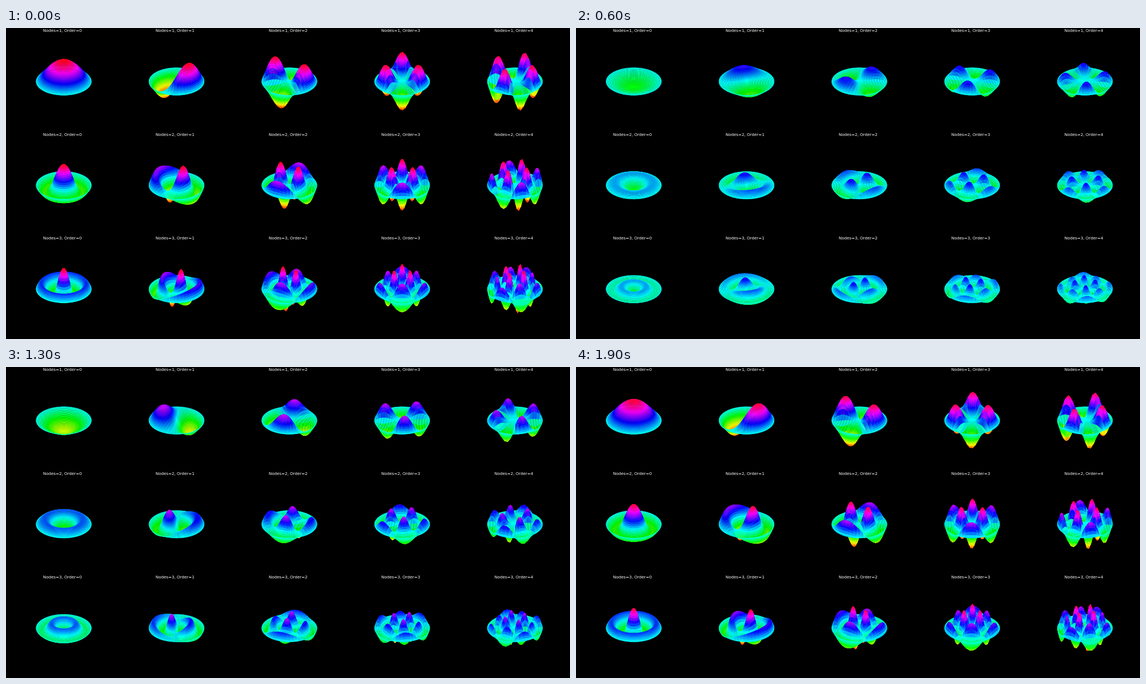
Animation of 1007 by 556 pixels, one loop 2000 ms. Source, as a matplotlib script:

```python
import numpy as np
import matplotlib.pyplot as plt
from matplotlib.animation import FuncAnimation
from matplotlib.collections import PathCollection
from matplotlib.path import Path

W, H, DPI = 1007, 556, 64
ROWS, COLS = 3, 5
FRAMES, INTERVAL = 20, 100
RINGS, SPOKES = 40, 50
ELEV, AZIM, DIST = np.radians(30), np.radians(-60), 10
SCALE = 95.1               # pixels per box unit at the view centre
R_SCALE = 8 / 7 / 2.2      # drum radius in box units
Z_SCALE = 6 / 7 / 2        # unit height in box units
SPIN = 0.3                 # share of the quarter-phase sine mode


def points(px):
    return px * 72 / DPI


def bessel(n, x):
    """Bessel function of the first kind, from its integral form."""
    tau = np.linspace(0, 2 * np.pi, 80, endpoint=False)
    return np.cos(n * tau - np.multiply.outer(x, np.sin(tau))).mean(axis=-1)


def bessel_zero(n, k):
    x = np.linspace(0.5, 16, 4000)
    y = bessel(n, x)
    i = np.flatnonzero(y[:-1] * y[1:] < 0)[k - 1]
    return x[i] - y[i] * (x[i + 1] - x[i]) / (y[i + 1] - y[i])


def quads(a):
    """Four corner values of every grid cell, panel by panel."""
    corners = [a[:, :-1, :-1], a[:, 1:, :-1], a[:, 1:, 1:], a[:, :-1, 1:]]
    return np.stack(corners, axis=-1).reshape(len(a), -1, 4)


radius = np.linspace(0, 1, RINGS)
theta = np.linspace(0, 2 * np.pi, SPOKES)
modes = [(k, n) for k in range(1, ROWS + 1) for n in range(COLS)]

cos_mode, sin_mode = [], []
for k, n in modes:
    zero = bessel_zero(n, k)
    peak = np.abs(bessel(n, np.linspace(0, zero, 500))).max()
    profile = bessel(n, zero * radius) / peak
    cos_mode.append(np.outer(profile, np.cos(n * theta)))
    sin_mode.append(np.outer(profile, np.sin(n * theta)))
cos_mode, sin_mode = np.array(cos_mode), np.array(sin_mode)

# Disc coordinates turned to the viewer: sideways and towards the camera
side = R_SCALE * np.outer(radius, np.sin(theta - AZIM))
near = R_SCALE * np.outer(radius, np.cos(theta - AZIM))

cell_w, cell_h = W / COLS, 185.6
center_x = np.array([(n + 0.5) * cell_w + 2.4 for k, n in modes])[:, None, None]
center_y = np.array([(k - 1) * cell_h + 94.5 for k, n in modes])[:, None, None]

fig = plt.figure(figsize=(W / DPI, H / DPI), dpi=DPI, facecolor="black")
ax = fig.add_axes([0, 0, 1, 1])
ax.set_xlim(0, W)
ax.set_ylim(H, 0)
ax.axis("off")

for k, n in modes:
    ax.text((n + 0.5) * cell_w, (k - 1) * cell_h + 7.2, f"Nodes={k}, Order={n}",
            color="white", family="DejaVu Sans", fontsize=points(7.2),
            ha="center", va="baseline")

# The paths are views into this buffer, so filling it moves the faces.
# Thin edges in the face colour close the seams between neighbours.
corners = np.zeros((len(modes) * (RINGS - 1) * (SPOKES - 1), 4, 2))
faces = PathCollection([Path(c) for c in corners], edgecolors="face",
                       linewidths=points(0.4), antialiaseds=True)
faces.set_joinstyle("bevel")
ax.add_collection(faces, autolim=False)
hsv = plt.get_cmap("hsv")


def update(frame):
    phase = 2 * np.pi * frame / FRAMES
    z = np.cos(phase) * cos_mode + SPIN * np.sin(phase) * sin_mode
    height = Z_SCALE * z
    depth = near * np.cos(ELEV) + height * np.sin(ELEV)
    up = height * np.cos(ELEV) - near * np.sin(ELEV)
    zoom = SCALE * DIST / (DIST - depth)
    px = center_x + side * zoom
    py = center_y - up * zoom

    # Paint each panel from back to front
    order = np.argsort(quads(depth).mean(axis=-1), axis=1, kind="stable")
    xy = np.stack([quads(px), quads(py)], axis=-1)
    xy = np.take_along_axis(xy, order[..., None, None], axis=1)
    level = np.take_along_axis(quads(z).mean(axis=-1), order, axis=1)
    corners[:] = xy.reshape(corners.shape)
    faces.set_facecolor(hsv((level.ravel() + 1) / 2))
    return (faces,)


anim = FuncAnimation(fig, update, frames=FRAMES, interval=INTERVAL,
                     repeat=True, repeat_delay=0, blit=False)
plt.show()
```
